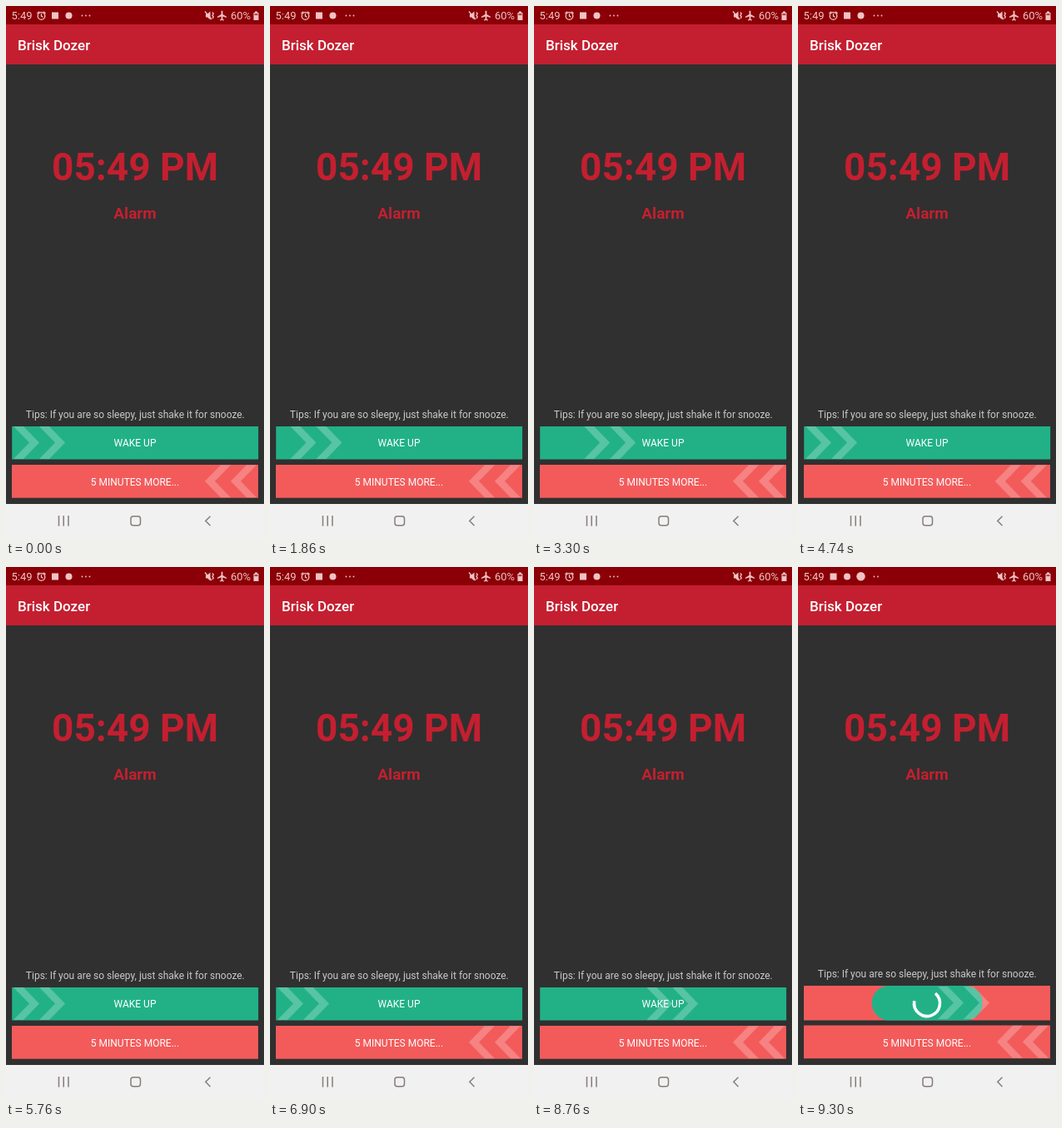
Write an HTML page that moves like this. It is 310 px wide and 639 px high and loops after 9360 ms.

```html
<!DOCTYPE html>
<html lang="en">
<head>
<meta charset="utf-8">
<title>Alarm screen</title>
<style>
  html, body { margin: 0; width: 100%; height: 100%; overflow: hidden; background: #303030; }
  svg { display: block; width: 310px; height: 639px; font-family: Roboto, sans-serif; }
  .mid { text-anchor: middle; }
  .accent { fill: #c41f30; font-weight: 700; }
  .icon { fill: #f0c3c5; }
  .line { fill: none; stroke: #f0c3c5; stroke-width: 1.3; }
  .nav { fill: none; stroke: #857d7a; stroke-width: 1.5; }
</style>
</head>
<body>
<svg viewBox="0 0 310 639">
  <defs>
    <path id="chevrons" d="M0 0H12L31 19.5L12 39H0L19 19.5ZM31 0H43L62 19.5L43 39H31L50 19.5Z" fill="#fff" fill-opacity=".24"/>
    <clipPath id="wakeClip"><rect x="7" y="502" width="296" height="42"/></clipPath>
    <clipPath id="moreClip"><rect x="7" y="549" width="296" height="41"/></clipPath>
  </defs>
  <rect width="310" height="639" fill="#303030"/>
  <rect width="310" height="22" fill="#8a0006"/>
  <rect y="22" width="310" height="48" fill="#c41f30"/>

  <g class="icon" font-size="13">
    <text x="6.5" y="16">5:49</text>
    <text x="270" y="16">60%</text>
  </g>
  <g id="alertsA">
    <g class="line">
      <circle cx="42.5" cy="12" r="4.3"/>
      <path d="M42.5 9.3V12.2L44.5 13.4M37.4 9L40 6.7M47.6 9L45 6.7"/>
    </g>
    <g class="icon">
      <rect x="55" y="7.5" width="8" height="8"/>
      <circle cx="75.5" cy="11.5" r="4"/>
      <circle cx="91.5" cy="11.5" r=".9"/><circle cx="96" cy="11.5" r=".9"/><circle cx="100.5" cy="11.5" r=".9"/>
    </g>
  </g>
  <g id="alertsB" class="icon">
    <rect x="38.5" y="7.5" width="8" height="8"/>
    <circle cx="59" cy="11.5" r="4"/>
    <circle cx="75.5" cy="11.2" r="5.2"/>
    <circle cx="91.5" cy="11.5" r=".9"/><circle cx="96" cy="11.5" r=".9"/>
  </g>
  <path class="icon" d="M240 9.5H242L245.5 6.5V16.5L242 13.5H240Z"/>
  <path class="line" d="M239 6.5L247 16M248 7.5L249.3 9.3L248 11.2L249.3 13L248 15"/>
  <path class="icon" d="M258.6 6.2Q259.5 5 260.4 6.2V10L265 12.8V14L260.4 12.6V15.5L262 16.7V17.5L259.5 16.9L257 17.5V16.7L258.6 15.5V12.6L254 14V12.8L258.6 10Z"/>
  <path class="icon" d="M299 6.5H302V8H303.5V17H297.5V8H299Z"/>
  <path d="M298.5 9H302.5V11.2H298.5Z" fill="#a94a4e"/>

  <text x="14" y="53" font-size="17" font-weight="500" fill="#fff">Brisk Dozer</text>
  <text class="mid accent" x="155" y="209" font-size="46">05:49 PM</text>
  <text class="mid accent" x="155" y="255" font-size="19">Alarm</text>
  <text id="tip" class="mid" x="155.3" y="493.5" font-size="12" fill="#c9c9c9">Tips: If you are so sleepy, just shake it for snooze.</text>

  <g id="wake">
    <rect id="back" x="7" y="504" width="296" height="39.5" fill="#f35b5b"/>
    <rect id="pill" y="504" height="39.5" fill="#22b187"/>
    <g clip-path="url(#wakeClip)"><use id="wakeArrow" href="#chevrons"/></g>
    <text id="wakeText" class="mid" x="155" y="528" font-size="12" fill="#fff">WAKE UP</text>
    <path id="spinner" fill="none" stroke="#fff" stroke-width="3.6"/>
  </g>
  <g id="more">
    <rect x="7" y="550" width="296" height="39.7" fill="#f35b5b"/>
    <g clip-path="url(#moreClip)"><use id="moreArrow" href="#chevrons"/></g>
    <text class="mid" x="155" y="575" font-size="12" fill="#fff">5 MINUTES MORE...</text>
  </g>

  <rect y="597" width="310" height="42" fill="#f1f1f1"/>
  <g class="nav">
    <path d="M63.5 611V623.5M69.2 611V623.5M75 611V623.5"/>
    <rect x="150" y="611.7" width="11.5" height="11" rx="3"/>
    <path d="M245.5 611.7L239.8 617.3L245.5 623"/>
  </g>
</svg>
<script>
  const LOOP = 9360, STEP = 60;
  const el = id => document.getElementById(id);
  const set = (id, attrs) => {
    for (const name in attrs) el(id).setAttribute(name, attrs[name]);
  };
  const show = (id, on) => set(id, { visibility: on ? "visible" : "hidden" });
  const clamp = v => Math.max(0, Math.min(1, v));

  // Drag out and back again
  const swing = (t, start, end, reach) =>
    reach * Math.sin(Math.PI * clamp((t - start) / (end - start))) ** 2;

  function wakeOffset(t) {
    if (t < 8060) return swing(t, 1700, 3600, 226);
    if (t <= 9060) return 230 * clamp((t - 8100) / 960) ** 1.6;
    return 230 - 71 * (t - 9060) / 240;
  }

  function arc(cx, cy, r, from, sweep) {
    const at = deg => {
      const a = deg * Math.PI / 180;
      return (cx + r * Math.cos(a)).toFixed(2) + " " + (cy + r * Math.sin(a)).toFixed(2);
    };
    return `M${at(from)}A${r} ${r} 0 ${Math.abs(sweep) > 180 ? 1 : 0} ${sweep > 0 ? 1 : 0} ${at(from + sweep)}`;
  }

  function draw(t) {
    const loading = t > 9060;
    const p = clamp((t - 9060) / 400);
    const k = 0.5 - 0.5 * Math.cos(Math.PI * p);
    const width = 296 - 249 * k;
    const top = loading ? 502 : 504;
    const height = loading ? 41.5 : 39.5;

    set("back", { y: top, height });
    show("back", loading);
    set("pill", { x: 155.2 - width / 2, y: top, width, height, rx: 20.5 * clamp(p * 2.5) });
    set("wakeArrow", { transform: `translate(${9 + wakeOffset(t)} ${loading ? 503 : 504})` });
    show("wakeText", !loading);
    show("spinner", loading);
    set("spinner", { d: arc(155, 523, 15.5, 190 - 150 * (0.6 - p), -(40 + 333 * p)) });

    const red = swing(t, 4690, 6540, -312);
    set("moreArrow", { transform: `translate(${301 + red} 550.3) scale(-1 1)` });
    set("more", { transform: `translate(0 ${loading ? -0.5 : 0})` });
    set("tip", { y: loading ? 491.5 : 493.5 });

    show("alertsA", t < 9180);
    show("alertsB", t >= 9180);
  }

  const begin = performance.now();
  function tick() {
    const t = (performance.now() - begin) % LOOP;
    draw(Math.floor(t / STEP) * STEP);
    requestAnimationFrame(tick);
  }
  tick();
</script>
</body>
</html>
```
